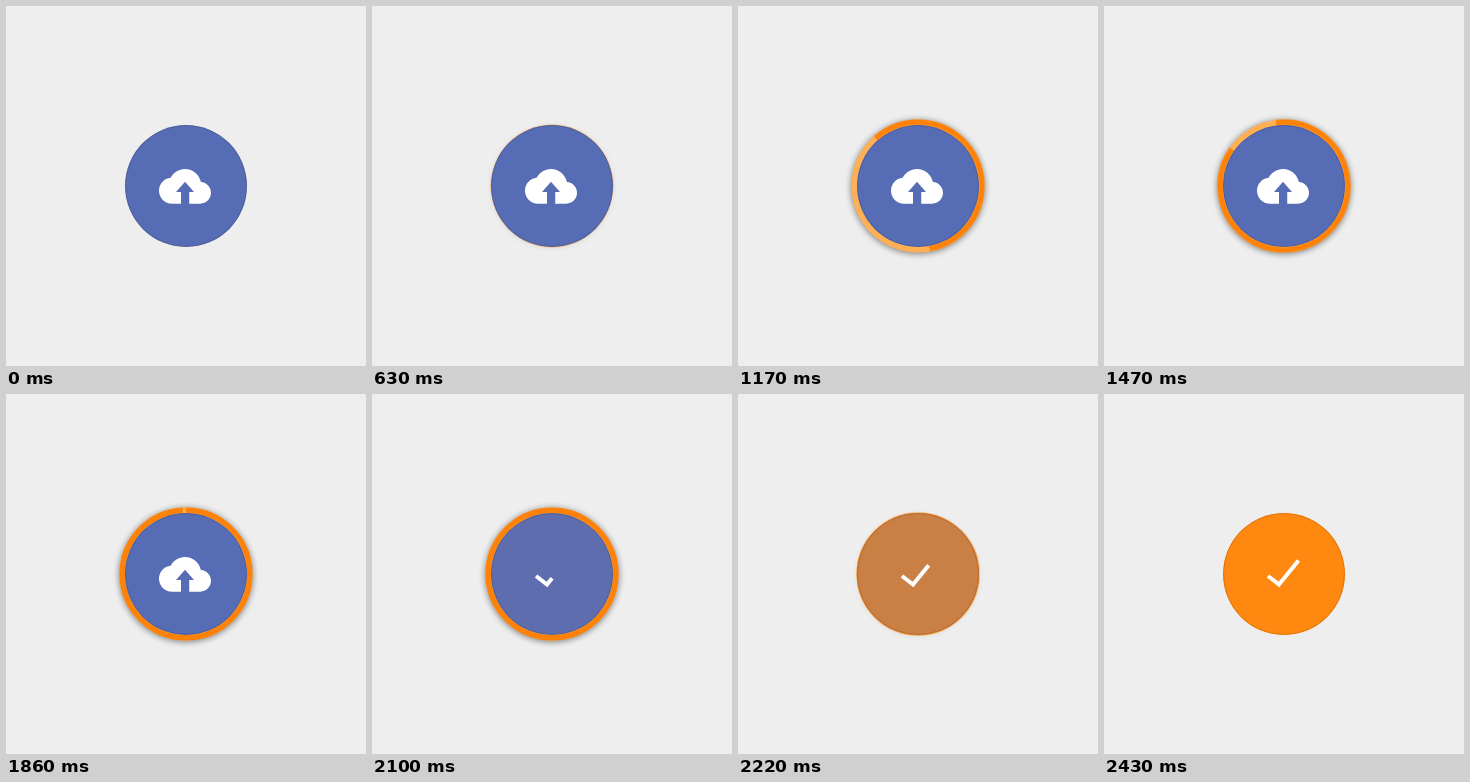
Write an HTML page without scripts that moves like this. It is 360 by 360 pixels and loops after 2.64 s.

```html
<!DOCTYPE html>
<html lang="en">
<head>
<meta charset="utf-8">
<title>Upload button</title>
<style>
  html, body { margin: 0; width: 100%; height: 100%; overflow: hidden; background: #eee; }
  svg { display: block; width: 100vw; height: 100vh; }

  .ring, .shadow, .arc, .spin, .disc, .cloud, .check { animation: 2640ms ease infinite; }
  .ring, .spin { transform-origin: 180px 180px; }
  .ring { animation-name: grow; animation-timing-function: linear; }
  .shadow { fill: #000; filter: blur(3px); animation-name: shade; animation-timing-function: linear; }
  .track { fill: #ffb055; }
  .spin { animation-name: spin; }
  .arc { fill: none; stroke: #ff8208; stroke-width: 5.5; animation-name: fill; }
  .disc { fill: #566cb4; animation-name: recolor; }
  .edge { fill: none; stroke: #000; stroke-opacity: .12; }
  .cloud { animation-name: leave; }
  .cloud path { fill: #fff; }
  .check { fill: none; stroke: #fff; stroke-width: 4; animation-name: draw; }

  @keyframes grow {
    0%, 23.3% { transform: scale(.91); }
    27.84%, 80.68% { transform: none; }
    84.66%, 100% { transform: scale(.91); }
  }
  @keyframes shade {
    0%, 23.3% { opacity: 0; }
    27.84%, 80.68% { opacity: .45; }
    84.66%, 100% { opacity: 0; }
  }
  @keyframes spin {
    0%, 25.53% { transform: rotate(90deg); }
    65.72%, 100% { transform: rotate(270deg); }
  }
  @keyframes fill {
    0%, 28.03% { stroke-dasharray: 0 360; }
    76.14%, 100% { stroke-dasharray: 360 360; }
  }
  @keyframes leave {
    0%, 73.86% { opacity: 1; }
    78.41%, 100% { opacity: 0; }
  }
  @keyframes recolor {
    0%, 78.79% { fill: #566cb4; }
    92.05%, 100% { fill: #ff8811; }
  }
  @keyframes draw {
    0%, 75% { stroke-dasharray: 0 100; }
    90.91%, 100% { stroke-dasharray: 100 100; }
  }
</style>
</head>
<body>
<svg viewBox="0 0 360 360">
  <g class="ring">
    <circle class="shadow" cx="180" cy="181" r="67"/>
    <circle class="track" cx="180" cy="180" r="66.5"/>
    <g class="spin">
      <circle class="arc" cx="180" cy="180" r="63.75" pathLength="360"/>
    </g>
  </g>
  <circle class="disc" cx="180" cy="180" r="61"/>
  <circle class="edge" cx="180" cy="180" r="60.5"/>
  <g class="cloud">
    <path transform="translate(153 154.33) scale(2.167)"
      d="M19.35 10.04C18.67 6.59 15.64 4 12 4 9.11 4 6.6 5.64 5.35 8.04 2.34 8.36 0 10.91 0 14c0 3.31 2.69 6 6 6h4.15v-5.4H7.85L12 9.9l4.15 4.7h-2.2V20H19c2.76 0 5-2.24 5-5 0-2.64-2.05-4.78-4.65-4.96z"/>
  </g>
  <path class="check" pathLength="100" d="M164 182 175 190.5 194.5 166.5"/>
</svg>
</body>
</html>
```
